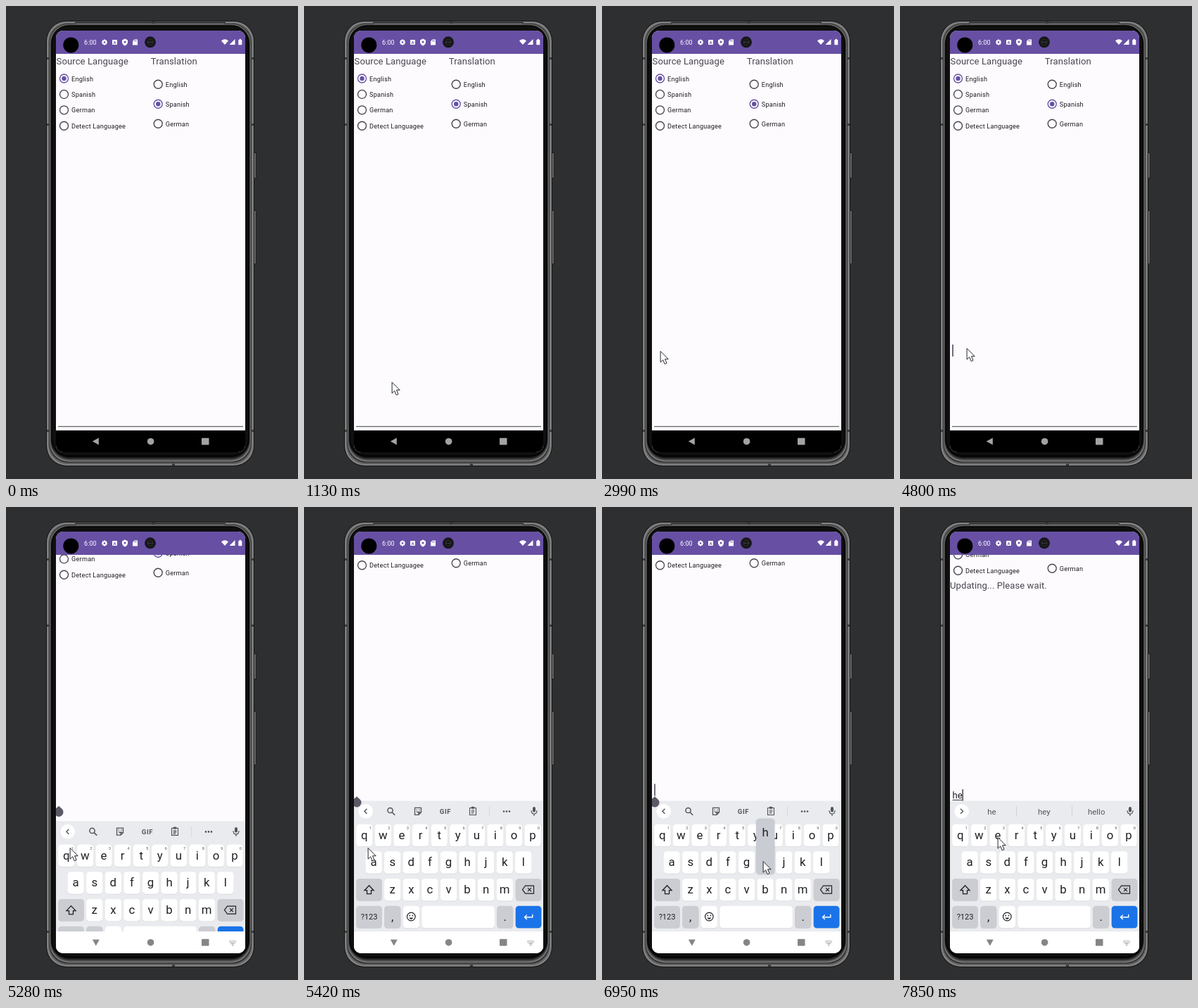
Write an HTML page with a canvas that moves like this. It is 415 by 672 pixels and loops after 8 s.

```html
<!DOCTYPE html>
<html lang="en">
<head>
<meta charset="utf-8">
<title>Translator phone demo</title>
<style>
html, body { margin: 0; width: 100%; height: 100%; overflow: hidden; background: #2e2f31; }
canvas { display: block; width: 415px; height: 672px; }
</style>
</head>
<body>
<canvas id="stage"></canvas>
<script>
const LOOP = 8000;
const canvas = document.getElementById('stage');
const ctx = canvas.getContext('2d');
const dpr = window.devicePixelRatio || 1;
canvas.width = 415 * dpr;
canvas.height = 672 * dpr;

const INK = '#1c1b1f', SOFT = '#49454f', PURPLE = '#6750a4', PAPER = '#fdfbfe';
const KEY_TEXT = '#202124', ICON = '#50545a', SPECIAL = '#cbcdd3';

// Moments of the story
const KEYBOARD_AT = 5210, H_DOWN = 6880, H_UP = 7090, E_DOWN = 7500, E_UP = 7640;
const BLINKS = [450, 950, 1460, 2020, 2450, 2990, 3520, 3980, 4480, 5010, 5490, 5990, 6500, 7020, 7090];
const POINTER = [
  [850, 192, 577], [1130, 125, 534], [1390, 125, 534], [1950, 89, 496], [2170, 90, 490],
  [2240, 89, 490], [2520, 83, 490], [4310, 83, 490], [4540, 97, 391], [4800, 95, 486],
  [5080, 91, 484], [5760, 91, 484], [6250, 195, 514], [6530, 222, 503], [6670, 229, 503],
  [7090, 229, 503], [7360, 142, 469], [7500, 139, 469], [7850, 139, 469]
];

const clamp = v => Math.max(0, Math.min(1, v));
const easeOut = v => 1 - (1 - clamp(v)) ** 3;
const within = (t, a, b) => t >= a && t < b;

function box(x, y, w, h, r, fill) {
  ctx.beginPath();
  ctx.roundRect(x, y, w, h, r);
  ctx.fillStyle = fill;
  ctx.fill();
}
function disc(x, y, r, fill) {
  ctx.beginPath();
  ctx.arc(x, y, r, 0, Math.PI * 2);
  ctx.fillStyle = fill;
  ctx.fill();
}
function ring(x, y, r, color, width) {
  ctx.beginPath();
  ctx.arc(x, y, r, 0, Math.PI * 2);
  ctx.strokeStyle = color;
  ctx.lineWidth = width;
  ctx.stroke();
}
function shape(d, x, y, fill, stroke, width = 1.3) {
  const path = new Path2D(d);
  ctx.save();
  ctx.translate(x, y);
  if (fill) { ctx.fillStyle = fill; ctx.fill(path); }
  if (stroke) { ctx.strokeStyle = stroke; ctx.lineWidth = width; ctx.stroke(path); }
  ctx.restore();
}
function text(s, x, y, size, color, align = 'left', spacing = 0, weight = 400) {
  ctx.font = `${weight} ${size}px Roboto, sans-serif`;
  ctx.letterSpacing = spacing + 'px';
  ctx.textAlign = align;
  ctx.fillStyle = color;
  ctx.fillText(s, x, y);
}

function drawPhone() {
  ctx.fillStyle = '#2e2f31';
  ctx.fillRect(0, 0, 415, 672);
  for (const [y, h] of [[208, 37], [290, 77]]) {
    box(351, y, 4.4, h, 1, '#1b1b1b');
    box(352.8, y + 1, 1.7, h - 2, 0.5, '#858585');
  }
  // [inset, extra inset at the bottom, corner radius, colour]
  const layers = [
    [0, 0, 29, '#161616'], [1, 0, 28, '#767676'], [2, 0, 27, '#8a8a8a'],
    [3, 0, 27, '#626262'], [4.4, 0.8, 27, '#2c2c2c'], [5.2, 1.4, 27, '#757575'],
    [6, 2.6, 27, '#4a4a4a'], [6.8, 4, 26, '#1f1f1f'], [7.4, 5.6, 25, '#050505'], [9, 7, 22, '#101010']
  ];
  for (const [d, low, r, color] of layers)
    box(57 + d, 21 + d * 0.9, 296 - 2 * d, 633 - 1.9 * d - low, r, color);
  box(98, 22.8, 214, 2, 1, '#1c1c1c');
  box(99, 24.6, 212, 1, 0.5, '#8c8c8c');
  ctx.fillStyle = '#3a3a3a';
  for (const y of [73, 167, 602]) {
    ctx.fillRect(58, y, 4, 3);
    ctx.fillRect(348, y, 4, 3);
  }
  ctx.fillRect(207, 22, 4, 3);
  ctx.fillRect(236, 650, 4, 3);
}

function drawStatus() {
  box(71, 35, 269, 33, [10, 10, 0, 0], PURPLE);
  disc(92.3, 55.4, 11, '#000');
  text('6:00', 111, 55, 9, '#fff', 'left', 0.1);
  for (let i = 0; i < 4; i++) {
    ctx.save();
    ctx.translate(140, 51.5);
    ctx.rotate(i * Math.PI / 4);
    box(-4, -1, 8, 2, 0.3, '#fff');
    ctx.restore();
  }
  disc(140, 51.5, 3, '#fff');
  disc(140, 51.5, 1.3, PURPLE);
  box(151, 48, 7, 7, 1, '#fff');
  text('A', 154.5, 54, 6, PURPLE, 'center', 0, 700);
  shape('M0-5L4-3V0Q3.5 3.5 0 5Q-3.5 3.5-4 0V-3Z', 169, 51.5, '#fff');
  disc(169, 51, 1.5, PURPLE);
  shape('M-1-4H3.5V4H-3.5V-1.5Z', 183.5, 51.5, '#fff');
  ctx.fillStyle = PURPLE;
  ctx.fillRect(182.5, 48.5, 1, 2);
  ctx.fillRect(184.5, 48.5, 1, 2);
  disc(205, 51.3, 8, '#17171a');
  ring(205, 51.3, 4, '#29292d', 1);
  for (const x of [202.3, 205, 207.7]) disc(x, 51.3, 0.6, '#77777d');
  shape('M-5-1.5Q0-6 5-1.5L0 4Z', 311, 51, '#fff');
  shape('M4-4V4H-4Z', 321.5, 51, '#fff');
  box(330.3, 48, 5, 7.3, 0.7, '#fff');
  box(331.7, 46.8, 2.2, 2, 0, '#fff');
}

function radio(x, y, label, on) {
  ring(x, y, 6, on ? PURPLE : SOFT, 1.35);
  if (on) disc(x, y, 3.2, PURPLE);
  text(label, x + 10.6, y + 3.5, 9.14, INK, 'left', 0.22);
}

function caretOn(t) {
  return BLINKS.filter(b => b <= t).length % 2 === 1;
}

function drawContent(t, shift) {
  const typed = t >= E_UP ? 'he' : t >= H_UP ? 'h' : '';
  ctx.save();
  ctx.beginPath();
  ctx.rect(71, 68, 269, 535);
  ctx.clip();
  ctx.translate(0, -shift);
  text('Source Language', 71.6, 83, 13.06, SOFT, 'left', 0.1);
  text('Translation', 205.8, 83, 13.06, SOFT, 'left', 0.1);
  ['English', 'Spanish', 'German', 'Detect Languagee']
    .forEach((s, i) => radio(82.5, 103 + i * 22.4, s, i === 0));
  ['English', 'Spanish', 'German']
    .forEach((s, i) => radio(216.2, 111.2 + i * 28, s, i === 1));
  if (typed) text('Updating... Please wait.', 71, 196, 13.06, SOFT, 'left', 0.08);
  ctx.fillStyle = '#68656c';
  ctx.fillRect(74, 596.8, 263, 1.3);
  text(typed, 74.6, 494, 13.06, INK);
  const width = typed ? ctx.measureText(typed).width : 0;
  ctx.fillRect(74.6, 495.8, width, 0.9);
  if (caretOn(t)) {
    ctx.fillStyle = '#716d78';
    ctx.fillRect(74 + width, 481, 2, 17);
  }
  ctx.restore();
}

function drawNav(light) {
  box(71, 603, 269, 31, [0, 0, 10, 10], light ? '#fff' : '#000');
  const color = light ? '#858585' : '#a3a3a3';
  shape(light ? 'M-5-4H5L0 5Z' : 'M4-5V5L-5 0Z', 127.8, 618.5, color);
  disc(205.6, 618.7, 4.8, color);
  box(278, 613.8, 10.5, 9.8, 0.8, color);
  if (!light) return;
  for (let r = 0; r < 2; r++)
    for (let c = 0; c < 5; c++) {
      ctx.fillStyle = '#999';
      ctx.fillRect(317.5 + c * 2, 616 + r * 2, 1.2, 1.2);
    }
  ctx.fillRect(319.5, 620, 5.3, 1);
  shape('M-1.5 0H1.5L0 1.7Z', 322.2, 622, '#999');
}

function key(x, y, w, label, fill = '#fff') {
  box(x, y + 0.7, w, 31.5, 4.5, '#d3d5d9');
  box(x, y, w, 31.5, 4.5, fill);
  if (label) text(label, x + w / 2, y + 21, 16.8, KEY_TEXT, 'center');
}

function drawMic() {
  box(325, 426, 4, 7.5, 2, ICON);
  shape('M-4-1Q-4 4 0 4Q4 4 4-1M0 4V7', 327, 432, null, ICON, 1.2);
}

function drawToolbar(t) {
  const typed = t >= H_UP;
  disc(87.7, 432.3, 10.3, '#fff');
  shape(typed ? 'M-1.7-3.5L1.8 0L-1.7 3.5' : 'M1.7-3.5L-1.8 0L1.7 3.5', 87.7, 432.3, null, ICON, 1.4);
  drawMic();
  if (typed) {
    const words = t >= E_UP + 70 ? ['he', 'hey', 'hello'] : ['h', 'he', 'have'];
    words.forEach((w, i) => text(w, 130.4 + i * 74.4, 436.8, 11.4, '#55585d', 'center'));
    ctx.fillStyle = '#cfd1d5';
    ctx.fillRect(165, 425, 1, 15);
    ctx.fillRect(244, 425, 1, 15);
    return;
  }
  ring(122.5, 431, 3.6, ICON, 1.5);
  shape('M0 0L4 4', 125.2, 433.7, null, ICON, 1.6);
  shape('M-4.5-5H4.5V1.5L1 5H-4.5ZM4.5 1.5H1V5M-2 0Q0 3 2 0', 162, 432.3, null, ICON);
  disc(160.2, 430.2, 0.8, ICON);
  disc(164, 430.2, 0.8, ICON);
  text('GIF', 201, 436, 9.5, ICON, 'center', 0.7, 700);
  shape('M-4.5-4.5H4.5V5.5H-4.5ZM-2.3-1H2.3M-2.3 1H2.3M-2.3 3H1', 240, 432, null, ICON, 1.1);
  box(237.7, 425.7, 4.6, 3, 1, ICON);
  ctx.fillStyle = '#d6d8dc';
  ctx.fillRect(263, 425, 1, 15);
  for (const x of [284, 288, 292]) disc(x, 432.5, 1.3, ICON);
}

function popup(x, y, letter) {
  ctx.save();
  ctx.shadowColor = 'rgba(0,0,0,.25)';
  ctx.shadowBlur = 2;
  box(x, y, 26, 79, 5, '#c9ccd3');
  ctx.restore();
  text(letter, x + 13, y + 25, 16.8, KEY_TEXT, 'center');
}

function drawKeyboard(t, drop) {
  ctx.save();
  ctx.beginPath();
  ctx.rect(71, 68, 269, 535);
  ctx.clip();
  ctx.translate(0, drop);
  ctx.fillStyle = '#e9ebee';
  ctx.fillRect(71, 417.5, 269, 186);
  drawToolbar(t);
  const pitch = 26.58;
  [...'qwertyuiop'].forEach((c, i) => {
    key(74.2 + i * pitch, 450.7, 23.3, c);
    text((i + 1) % 10, 94.2 + i * pitch, 458.3, 5.8, '#55585d', 'center');
  });
  [...'asdfghjkl'].forEach((c, i) => key(87.5 + i * pitch, 489.3, 23.3, c));
  [...'zxcvbnm'].forEach((c, i) => key(114.1 + i * pitch, 528, 23.3, c));

  key(74.2, 528, 36.7, '', SPECIAL);
  shape('M0-6L6.5 1H3V6H-3V1H-6.5Z', 92.5, 543.7, null, KEY_TEXT, 1.3);
  key(300.7, 528, 36.7, '', SPECIAL);
  shape('M-4-5.5H8V5.5H-4L-8 0ZM-.5-2.5L4.5 2.5M4.5-2.5L-.5 2.5', 318.5, 543.7, null, KEY_TEXT, 1.2);

  key(74.2, 566.8, 36.7, '', SPECIAL);
  text('?123', 92.5, 586.3, 11, KEY_TEXT, 'center');
  key(114.1, 566.8, 23.3, ',', SPECIAL);
  key(140.7, 566.8, 23.3, '');
  ring(152.3, 582, 5.8, KEY_TEXT, 1.2);
  disc(150.2, 580.4, 0.9, KEY_TEXT);
  disc(154.4, 580.4, 0.9, KEY_TEXT);
  shape('M-3 0Q0 4.5 3 0Z', 152.3, 583.4, KEY_TEXT);
  key(167.3, 566.8, 103.5, '');
  key(274, 566.8, 23.3, '.', SPECIAL);
  key(300.7, 566.8, 36.7, '', '#1a73e8');
  shape('M6-4V0H-5M-2-3.3L-5.3 0L-2 3.3', 318.8, 582.7, null, '#fff', 1.4);

  if (within(t, H_DOWN, H_UP)) popup(219.2, 443, 'h');
  if (within(t, E_DOWN, E_UP)) popup(126.2, 404.4, 'e');
  ctx.restore();
}

function drawHandle(shift) {
  ctx.save();
  ctx.beginPath();
  ctx.rect(71, 68, 269, 566);
  ctx.clip();
  shape('M0 0L4.7 4.2A6.5 6.5 0 1 1-4.7 4.2Z', 75, 498.7 - shift, '#5d5866');
  ctx.restore();
}

function drawPointer(t) {
  if (t < POINTER[0][0]) return;
  let i = POINTER.findIndex(p => p[0] > t);
  if (i < 0) i = POINTER.length - 1;
  const [t0, x0, y0] = POINTER[i - 1], [t1, x1, y1] = POINTER[i];
  const k = clamp((t - t0) / (t1 - t0));
  ctx.lineJoin = 'round';
  shape('M.5.5V16.2L4.1 12.8L6.6 18.7L9.4 17.5L6.9 11.7H11.6Z',
    x0 - 0.4 + (x1 - x0) * k, y0 + (y1 - y0) * k, '#fff', '#26262b', 1);
  ctx.lineJoin = 'miter';
}

function render(t) {
  ctx.setTransform(dpr, 0, 0, dpr, 0, 0);
  const open = t >= KEYBOARD_AT;
  const rise = open ? easeOut((t - KEYBOARD_AT + 40) / 240) : 0;
  const shift = t >= H_UP ? 80 : 87.5 * rise;
  drawPhone();
  box(71, 35, 269, 599, 10, PAPER);
  drawContent(t, shift);
  drawStatus();
  if (open) drawKeyboard(t, 186 * (1 - rise));
  drawNav(open);
  if (open && t < H_UP) drawHandle(shift);
  drawPointer(t);
}

const start = performance.now();
function tick() {
  render((performance.now() - start) % LOOP);
  requestAnimationFrame(tick);
}
tick();
</script>
</body>
</html>
```
